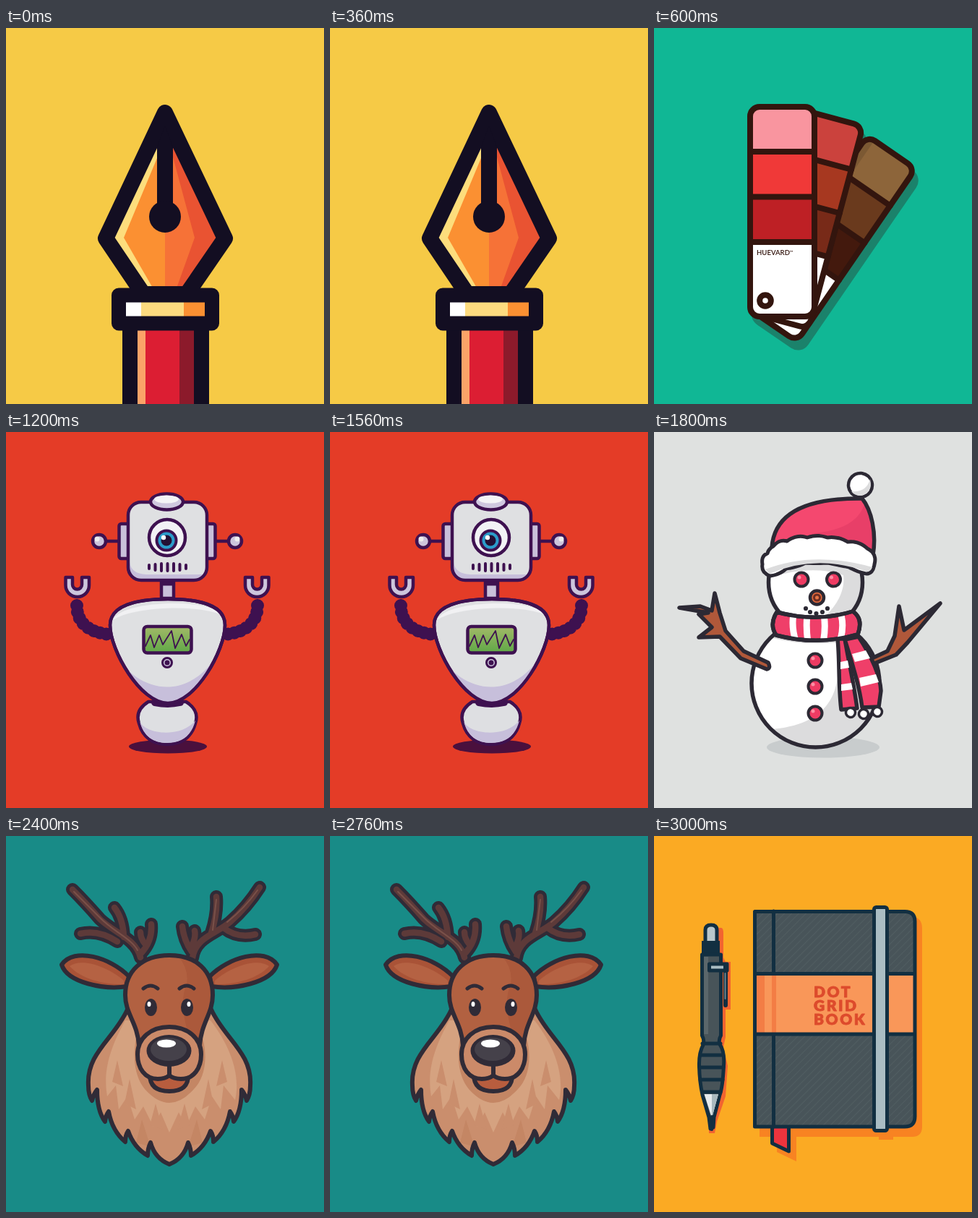
Animation of 440 by 520 pixels, one loop 3600 ms. Source, as an HTML page:

```html
<!DOCTYPE html>
<html lang="en">
<head>
<meta charset="utf-8">
<title>Six flat icons</title>
<style>
  html, body { margin: 0; width: 100%; height: 100%; overflow: hidden; }
  svg { display: block; width: 440px; height: 520px; }
  .scene { display: none; stroke-linejoin: round; stroke-linecap: round; }
  .scene.on { display: inline; }
  .n { stroke: none; }
  .o { fill: none; }
  text { font-family: Lato, "Open Sans", sans-serif; stroke: none; }
  .heavy text { stroke: #dd4b2c; stroke-width: .8; }
</style>
</head>
<body>
<svg viewBox="0 0 440 520">
  <defs>
    <clipPath id="headClip"><rect x="169" y="97" width="109" height="108" rx="18"/></clipPath>
    <clipPath id="torsoClip"><path id="torso" d="M224 231C268 231 303 240 303 267C303 302 262 375 224 375S144 302 144 267C144 240 180 231 224 231Z"/></clipPath>
    <clipPath id="snowClip"><circle id="snow" cx="223.500" cy="347.500" r="88.500"/></clipPath>
    <clipPath id="faceClip"><circle id="face" cx="223.500" cy="208" r="65"/></clipPath>
    <clipPath id="hatClip"><path id="hat" d="M163 160C166 116 203 91 288 92C301 108 308 140 303 170Z"/></clipPath>
    <clipPath id="scarfClip"><path id="scarf" d="M170 249Q224 264 275 248Q290 258 282 280Q226 296 169 281Q159 266 170 249Z"/></clipPath>
    <clipPath id="furClip"><path id="fur" d="M168 240C150 280 111 300 114 345Q114 358 119 366Q121 357 126 351Q126 380 137 395Q138 386 142 381Q147 408 165 423Q165 414 169 408Q177 431 196 442Q196 432 200 424Q206 446 226 454Q246 446 252 424Q256 432 256 442Q275 431 283 408Q287 414 287 423Q305 408 310 381Q314 386 315 395Q326 380 326 351Q331 357 333 366Q338 358 338 345C341 300 302 280 284 240Z"/></clipPath>
    <clipPath id="deerClip"><path id="deer" d="M226 165C264 165 286 187 286 220C286 246 270 258 268 290H184C182 258 165 246 165 220C165 187 188 165 226 165Z"/></clipPath>
    <path id="antlers" d="M186 168C180 142 150 134 130 115Q110 92 92 74M103 135Q128 129 154 146M150 99Q162 114 163 140M201 122Q203 145 187 162M186 133Q186 142 193 150M258 169C262 140 290 136 310 119Q333 99 351 71M291 84Q293 107 284 134M244 125Q246 144 257 160M261 131Q263 140 257 152M345 136Q320 142 301 127"/>
    <path id="cover" d="M139.500 104.500H347Q361 104.500 361 118V388Q361 402 347 402H139.500Z"/>
    <pattern id="hatch" width="7" height="7" patternUnits="userSpaceOnUse" patternTransform="rotate(45)">
      <path d="M0 0V7" stroke="#5b696c" stroke-width="1.6"/>
    </pattern>
    <linearGradient id="screen" x2="0" y2="1">
      <stop stop-color="#a3b968"/><stop offset="1" stop-color="#5fa847"/>
    </linearGradient>
  </defs>

  <!-- Fountain pen -->
  <g class="scene" stroke="#130e22">
    <path class="n" fill="#f6ca46" d="M0 0H440V520H0Z"/>
    <g class="n">
      <path fill="#fb9032" d="M220 117L138 291 190 368H220Z"/>
      <path fill="#f67237" d="M220 117L303 291 250 368H220Z"/>
      <path fill="#fddd7c" d="M214 150L138 291 190 368H208L163 290 214 168Z"/>
      <path fill="#e95332" d="M226 150L303 291 250 368H233L261 290 226 160Z"/>
      <path fill="#fba368" d="M180 410h14v110h-14Z"/>
      <path fill="#dc1e33" d="M193 410h47v110h-47Z"/>
      <path fill="#8c1a2b" d="M240 410h21v110h-21Z"/>
      <path fill="#fff" d="M165 378h23v22h-23Z"/>
      <path fill="#fddb7f" d="M187 378h59v22h-59Z"/>
      <path fill="#fb9032" d="M246 378h30v22h-30Z"/>
    </g>
    <path class="o" stroke-width="22" d="M220 117L138 291 190 368H250L303 291ZM220 122V255"/>
    <path class="n" fill="#130e22" d="M209 165L220 135 231 165Z"/>
    <circle class="n" fill="#130e22" cx="220" cy="261" r="22"/>
    <path class="o" stroke-width="21" d="M171.500 418V530M270.500 418V530"/>
    <rect class="o" stroke-width="20" x="156" y="369.500" width="129" height="39"/>
  </g>

  <!-- Colour swatches -->
  <g class="scene" stroke="#33150e" stroke-width="8">
    <path class="n" fill="#10b795" d="M0 0H440V520H0Z"/>
    <g id="fan"></g>
    <text x="142" y="314" font-size="9.600" font-weight="600" fill="#33150e">HUEVARD<tspan font-size="6" dy="-2">™</tspan></text>
    <circle cx="154" cy="377" r="7.800" fill="#fff"/>
  </g>

  <!-- Robot -->
  <g class="scene" stroke="#3e1150" stroke-width="4.500">
    <path class="n" fill="#e43c27" d="M0 0H440V520H0Z"/>
    <ellipse class="n" fill="#4a103d" cx="224" cy="435" rx="54" ry="9.500"/>
    <g id="robotSide">
      <path d="M139 151H156"/>
      <circle cx="129" cy="151" r="9" fill="#cdc5dc"/>
      <circle class="n" cx="126" cy="148" r="3.500" fill="#eee"/>
      <rect x="156.500" y="127" width="14" height="48" rx="3" fill="#c9c0da"/>
      <path class="o" stroke-width="18" stroke-dasharray="0 9" d="M98 240C98 262 112 277 144 280"/>
      <path class="o" stroke-width="13" d="M98 238C98 262 112 277 144 280"/>
      <path fill="#cdc5dc" d="M82.500 201H92V211A6.500 6.500 0 0 0 105 211V201H115V212A16.200 16 0 0 1 82.500 212Z"/>
    </g>
    <use href="#robotSide" transform="matrix(-1 0 0 1 446 0)"/>
    <path fill="#c9c0da" d="M215 205H232V230H215Z"/>
    <path stroke-width="7" d="M217 209H230"/>
    <path fill="#dedfe2" d="M197 373H249C262 381 266 391 262 403C257 422 243 432 223 432S189 422 184 403C180 391 184 381 197 373Z"/>
    <path class="n" fill="#c7bfdb" d="M185 400C192 418 242 424 262 399C257 420 243 430 223 430S190 420 185 400Z"/>
    <path stroke-width="10" d="M206 374Q224 378 241 374"/>
    <use href="#torso" fill="#dfe0e2"/>
    <path class="n" clip-path="url(#torsoClip)" fill="#c7bfdb" d="M140 290C180 370 260 375 300 295L270 390H180Z"/>
    <path class="n" clip-path="url(#torsoClip)" fill="#f1f1f3" d="M148 260C160 232 285 230 296 252C260 238 175 242 148 260Z"/>
    <use href="#torso" class="o"/>
    <g clip-path="url(#headClip)" class="n">
      <path fill="#dfe0e2" d="M160 90H290V210H160Z"/>
      <path fill="#c7bfdb" d="M160 90H171V180Q173 196 194 197H290V210H160Z"/>
    </g>
    <rect class="o" x="169" y="97" width="109" height="108" rx="18"/>
    <ellipse cx="222.500" cy="96.500" rx="22.500" ry="11" fill="#cfc8df"/>
    <ellipse class="n" cx="222" cy="93" rx="17" ry="5.500" fill="#f4f4f6"/>
    <circle cx="223" cy="146" r="25" fill="#f2f2f5"/>
    <circle cx="222" cy="150" r="13.500" fill="#2b9cca" stroke-width="4"/>
    <circle class="n" cx="222" cy="150" r="7.500" fill="#241035"/>
    <circle class="n" cx="218" cy="146" r="3.200" fill="#fff"/>
    <path stroke-width="4" d="M198 184V189M206.500 183V191M215 182V192M223.500 182V192M232 182V192M240.500 183V191M249 184V189"/>
    <rect x="190.500" y="269" width="66" height="36.500" rx="5" fill="url(#screen)"/>
    <path class="o" stroke-width="1.800" d="M193 296L200 281 205 298 212 281 217 294 229 275 234 299 243 280 249 296 254 287"/>
    <circle cx="223" cy="319" r="6.500" fill="#cfc8df" stroke-width="3"/>
    <circle class="n" cx="223" cy="319" r="3.500" fill="#3e1150"/>
  </g>

  <!-- Snowman -->
  <g class="scene" stroke="#2c2934" stroke-width="5.500">
    <path class="n" fill="#dfe1e0" d="M0 0H440V520H0Z"/>
    <ellipse class="n" fill="#c8cccd" cx="234" cy="436" rx="78" ry="14.500"/>
    <use href="#snow" class="n" fill="#fff"/>
    <path class="n" clip-path="url(#snowClip)" fill="#dcdcdd" d="M250 270C264 345 258 410 145 412L200 450H330V270Z"/>
    <path class="n" clip-path="url(#snowClip)" fill="#dcdcdd" d="M160 270Q224 302 290 270V285Q224 300 164 285Z"/>
    <use href="#snow" class="o"/>
    <path fill="#b0583a" d="M35 243L64 241 80 247 84 223 91 250 99 275 124 303 158 319Q162 327 156 328L120 313 91 283 62 284 80 270 62 252 75 250Z"/>
    <path fill="#b0583a" d="M295 316L323 303 333 282 339 241 346 274 396 237 351 291 335 308 295 324Z"/>
    <use href="#face" class="n" fill="#fff"/>
    <path class="n" clip-path="url(#faceClip)" fill="#dcdcdd" d="M150 180H300V265H225C252 245 265 220 262 198C235 188 195 188 150 205Z"/>
    <use href="#face" class="o"/>
    <path fill="#ef3f69" d="M254 286H264C269 316 277 350 281 382L259 384C255 352 257 315 254 286Z"/>
    <path class="n" fill="#fff" d="M258 318L268 316 270 326 258 328ZM259 349L273 347 275 356 259 358Z"/>
    <path fill="#ef3f69" d="M264 287L283 283C302 312 313 338 314 358L311 380 288 381C284 350 273 316 264 287Z"/>
    <path class="n" fill="#fff" d="M274 307L293 302 299 313 278 318ZM284 340L307 335 311 346 286 352Z"/>
    <g fill="#fff" stroke-width="3.500" stroke-dasharray="5 1">
      <circle cx="272" cy="388" r="6.500"/><circle cx="290" cy="390" r="6.500"/><circle cx="309" cy="387" r="6.500"/>
    </g>
    <use href="#scarf" fill="#ef3f69"/>
    <path class="o" clip-path="url(#scarfClip)" stroke="#fff" stroke-width="9" stroke-linecap="butt" d="M193 252Q190 270 196 289M212 253Q210 270 213 291M235 253Q238 270 234 292M258 250Q264 268 257 290"/>
    <use href="#scarf" class="o"/>
    <g class="n" clip-path="url(#hatClip)">
      <path fill="#f4486f" d="M150 80H320V180H150Z"/>
      <path fill="#e83f68" d="M293 92C288 122 262 136 222 140L210 170H320V92Z"/>
    </g>
    <use href="#hat" class="o"/>
    <path fill="#fff" stroke-width="5" stroke-dasharray="9 .8" d="M165 158Q173 148 184 151Q198 141 212 146Q226 141 240 146Q255 144 268 152Q283 150 295 161Q309 168 305 183Q303 196 294 196Q282 194 270 187Q255 184 240 181Q225 182 210 181Q197 187 183 189Q173 198 160 199Q148 194 150 183Q148 171 157 168Q158 162 165 158Z"/>
    <path class="n" fill="#dcdcdd" d="M154 190Q220 164 302 187Q300 193 294 193Q225 168 160 196Z"/>
    <circle cx="285.500" cy="73.500" r="16.500" fill="#fff" stroke-width="4.500" stroke-dasharray="9 1"/>
    <path class="n" fill="#dcdcdd" d="M299 65Q303 84 286 88Q277 88 273 82Q294 84 299 65Z"/>
    <g fill="#ee3b63" stroke-width="4" id="buttons"></g>
    <circle cx="225.500" cy="229" r="9.500" fill="#df683d" stroke-width="4.500"/>
    <circle class="n" cx="225.500" cy="229" r="5.500" fill="#6d2d22"/>
    <circle class="n" cx="225.500" cy="229" r="2.500" fill="#e57545"/>
    <path class="o" stroke-width="6.200" d="M210 244h0M216 249h0M224.500 251h0M233 249h0M240 244h0"/>
  </g>

  <!-- Reindeer -->
  <g class="scene" stroke="#302b37" stroke-width="6">
    <path class="n" fill="#188b87" d="M0 0H440V520H0Z"/>
    <use href="#antlers" class="o" stroke-width="18"/>
    <use href="#antlers" class="o" stroke="#5d3a39" stroke-width="8.500"/>
    <path class="o" stroke="#7a5149" stroke-width="2" d="M182 158C174 142 148 132 129 112L94 77M286 130L291 88M306 119Q330 100 348 75"/>
    <g id="ear">
      <path fill="#a95337" d="M170 194C145 168 94 153 77 178C85 203 136 213 168 208Z"/>
      <path class="n" fill="#b56243" d="M163 200C140 180 104 168 88 180C104 198 137 206 163 205Z"/>
    </g>
    <use href="#ear" transform="matrix(-1 0 0 1 452 0)"/>
    <g class="n" clip-path="url(#furClip)">
      <path fill="#ca8e6d" d="M100 230H350V460H100Z"/>
      <path fill="#d5a280" d="M165 255C140 300 135 330 140 360L152 345 156 378 168 360 178 392 190 374 204 402 214 382 226 410 239 382 249 402 262 374 275 392 285 360 297 378 301 345 317 365C325 330 310 290 283 255Z"/>
      <path fill="#c48664" d="M183 265C172 310 180 335 192 350Q226 388 260 350C275 335 282 305 268 265Z"/>
      <path fill="#ca8e6d" d="M147 340l7-30 8 36ZM164 370l7-34 9 42ZM287 370l-7-34-9 42ZM306 340l-7-30-8 36ZM199 400l8-30 10 36ZM255 400l-8-30-10 36Z"/>
      <path fill="#c48664" d="M180 424l8-32 12 38ZM272 424l-8-32-12 38Z"/>
    </g>
    <use href="#fur" class="o"/>
    <g class="n" clip-path="url(#deerClip)">
      <path fill="#b26141" d="M160 160H290V295H160Z"/>
      <path fill="#ab593b" d="M232 160H290V295H260Q236 235 250 205Q254 180 232 160Z"/>
    </g>
    <use href="#deer" class="o"/>
    <path fill="#b85d3e" d="M199 330Q199 353 226 353T252 330Z"/>
    <path fill="#cb8a69" d="M226 264C252 264 270 280 270 302C270 321 260 336 242 336Q232 336 226 331Q220 336 210 336C192 336 182 321 182 302C182 280 200 264 226 264Z"/>
    <path class="o" d="M226 316V331"/>
    <ellipse class="n" cx="225.500" cy="297" rx="31" ry="22" fill="#302b37"/>
    <ellipse class="n" cx="225" cy="295" rx="25" ry="16" fill="#45414a"/>
    <ellipse class="n" cx="222" cy="287" rx="13" ry="5.500" fill="#fff"/>
    <path class="o" stroke-width="5" d="M190 211Q200 203 210 211M240 211Q250 203 260 211"/>
    <g class="n">
      <ellipse cx="200.500" cy="237" rx="8.500" ry="12" fill="#302b37"/><ellipse cx="250.500" cy="237" rx="8.500" ry="12" fill="#302b37"/>
      <ellipse cx="198" cy="232.500" rx="2.500" ry="3.500" fill="#fff"/><ellipse cx="253" cy="232.500" rx="2.500" ry="3.500" fill="#fff"/>
    </g>
  </g>

  <!-- Notebook and pencil -->
  <g class="scene" stroke="#122f41" stroke-width="5">
    <path class="n" fill="#fbaa23" d="M0 0H440V520H0Z"/>
    <g class="n" fill="#f88322">
      <path d="M146 112H357Q371 112 371 128V402Q371 416 357 416H331V420H311V416H197V450L170 437V416H146Z"/>
      <path fill="#f26430" d="M76 127H93Q96 127 96 135V168L99 174H106V240H99V278L96 292 102 318 99 360 87 395 84 411H76Z"/>
    </g>
    <path fill="#ee343d" d="M163.500 400H186.500V436L163.500 425Z"/>
    <use href="#cover" class="n" fill="#485459"/>
    <use href="#cover" class="n" fill="url(#hatch)" opacity=".55"/>
    <path class="n" fill="#f99759" d="M142 190H359V274H142Z"/>
    <path class="n" fill="#f37d45" d="M142 190H153V274H142ZM163 190H169V274H163Z"/>
    <path class="o" d="M140 190.500H360M140 274H360M165.500 104V188M165.500 274V402"/>
    <use href="#cover" class="o"/>
    <g class="heavy" fill="#dd4b2c" font-size="21" font-weight="900" letter-spacing="2.500">
      <text x="221" y="223">DOT</text><text x="221" y="242">GRID</text><text x="221" y="260.500">BOOK</text>
    </g>
    <rect x="304.500" y="98.500" width="18" height="309" rx="3" fill="#aabdc3"/>
    <path fill="#b9c7cb" d="M71 150V130Q71 123 79 123T87 130V150Z"/>
    <path class="n" fill="#122f41" d="M66 145H91V165H66Z"/>
    <path fill="#485459" d="M66.500 164H92.500V276Q89 282 91 288Q98 298 96.500 318Q95 348 91 358L83 389 82 403 78 405 76 389 67 358Q63 340 62.500 318Q62 300 68 289Q70 282 66.500 276Z"/>
    <path class="n" fill="#5b676b" d="M69 167H75V274H69Z"/>
    <path class="n" fill="#e5ebed" d="M69.500 357H89L80 390Z"/>
    <path class="n" fill="#a9b9bf" d="M80 357H89L80 390Z"/>
    <path class="o" d="M67 287H92M64 303H95M63 320H96M64 337H95M67 354H92"/>
    <path class="o" stroke-width="4" d="M80 388V406"/>
    <path fill="#aabdc3" d="M76.500 177H101V186H76.500Z"/>
    <path class="o" stroke-width="6" d="M99 179V234"/>
    <path class="o" stroke="#71858d" stroke-width="2" d="M98.500 190V225"/>
  </g>
</svg>
<script>
// Swatch cards, from the back one to the front one
const cards = [
  { angle: 34.5, left: 141, colors: ['#8d653a', '#6a3a1d', '#43190d'] },
  { angle: 15, left: 141, colors: ['#cb423d', '#a73820', '#782a18'] },
  { angle: 0, left: 133, colors: ['#f9959f', '#f03938', '#be2025'] }
];
const turn = c => `rotate(${c.angle} 154 377)`;
const outline = c => `<rect x="${c.left}" y="109" width="${222 - c.left}" height="290" rx="13"/>`;

function drawCard(c, i) {
  const bands = c.colors.map((color, k) =>
    `<path fill="${color}" d="M133 ${109 + 62 * k}h89v62h-89Z"/>`).join('');
  const shade = i ? '' : '<path opacity=".12" d="M133 109h20v290h-20Z"/>';
  return `<g transform="${turn(c)}">
    <clipPath id="card${i}">${outline(c)}</clipPath>
    <g class="n" clip-path="url(#card${i})"><path fill="#fff" d="M133 109h89v290h-89Z"/>${bands}${shade}</g>
    <path d="M${c.left} 171H222M${c.left} 233.500H222M${c.left} 296H222"/>
    <g class="o">${outline(c)}</g></g>`;
}

const shadows = cards.slice(0, 2).map(c =>
  `<g transform="translate(5 13) ${turn(c)}">${outline(c)}</g>`).join('');
document.getElementById('fan').innerHTML =
  `<g fill="#1b826b" stroke="#1b826b">${shadows}<rect x="139" y="300" width="80" height="109" rx="13"/></g>` +
  cards.map(drawCard).join('');

document.getElementById('buttons').innerHTML =
  [[204, 204], [248.5, 204], [223, 316], [223, 352], [223, 389]].map(([x, y]) =>
    `<circle cx="${x}" cy="${y}" r="9.500"/><circle class="n" cx="${x - 3}" cy="${y - 3}" r="2.500" fill="#fb8fa4"/>`).join('');

const scenes = document.querySelectorAll('.scene');
function draw() {
  const current = Math.floor(performance.now() / 600) % scenes.length;
  scenes.forEach((scene, i) => scene.classList.toggle('on', i === current));
  requestAnimationFrame(draw);
}
draw();
</script>
</body>
</html>
```
